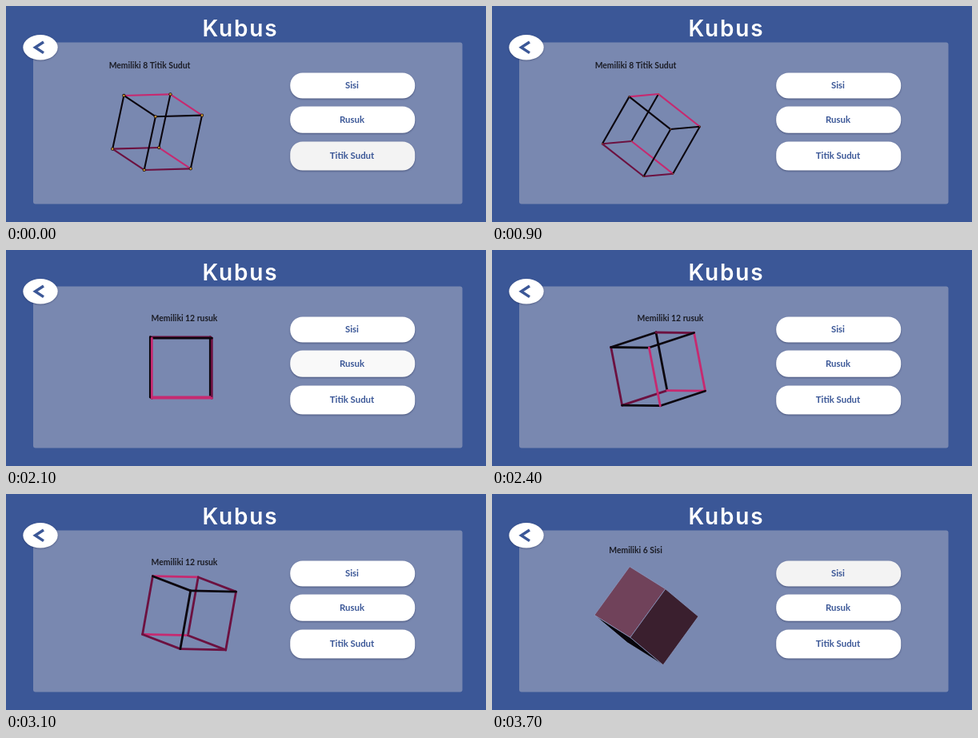
An HTML page with a canvas for the animation above (3.8 s loop, 600 by 270 pixels).

```html
<!DOCTYPE html>
<html lang="id">
<head>
<meta charset="utf-8">
<title>Kubus</title>
<style>
html, body { margin: 0; width: 100%; height: 100%; overflow: hidden; background: #3b5797; }
canvas { display: block; }
</style>
</head>
<body>
<canvas id="stage" width="600" height="270"></canvas>
<script>
const ctx = document.getElementById('stage').getContext('2d');
const LOOP = 3800, STEP = 100;
const BLUE = '#3b5797';
const INK = { k: '#0c060e', m: '#6c1140', p: '#c62a70' };

const clamp = x => Math.min(1, Math.max(0, x));
const progress = (t, from, to) => clamp((t - from) / (to - from));
const easeOut = f => Math.sin(f * Math.PI / 2);
const turn = (x, y, degrees) => {
  const r = degrees * Math.PI / 180;
  return [x * Math.cos(r) - y * Math.sin(r), x * Math.sin(r) + y * Math.cos(r)];
};

// Each cube stands on a fixed pivot: `lift` is the height of its centre above it, in cube sizes.
const cornerCube = { size: 71.7, x: 182, y: 191, lift: 0.5, line: 2.1 };
const edgeCube = { size: 75, x: 218.8, y: 207, lift: 0.8, line: 2.8 };
const solidCube = { size: 75, x: 171, y: 182.5, lift: 0.5 };

// Corner index bits: 1 = width, 2 = depth, 4 = height.
function corners({ size, x, y, lift }, { yaw, tilt, roll }) {
  return Array.from({ length: 8 }, (_, n) => {
    const [px, depth] = turn((n & 1) - 0.5, (n >> 1 & 1) - 0.5, -yaw);
    const [pz, py] = turn(depth, (n >> 2) - 0.5 - lift, tilt);
    const [sx, sy] = turn(px, py + 2 * Math.sin(tilt * Math.PI / 180) * pz * 0, roll);
    return [x + size * sx, y + size * sy, pz];
  });
}

// Corner pairs that differ in one bit: width edges, then depth, then height.
const EDGES = [1, 2, 4].flatMap(bit =>
  [...Array(8).keys()].filter(n => !(n & bit)).map(n => [n, n | bit]));

function drawWire(cube, points, colours) {
  const depth = ([a, b]) => points[a][2] + points[b][2];
  ctx.lineWidth = cube.line;
  ctx.lineCap = 'round';
  EDGES.map((edge, i) => ({ edge, colour: INK[colours[i]] }))
    .sort((p, q) => depth(p.edge) - depth(q.edge))
    .forEach(({ edge: [a, b], colour }) => {
      ctx.strokeStyle = colour;
      ctx.beginPath();
      ctx.moveTo(points[a][0], points[a][1]);
      ctx.lineTo(points[b][0], points[b][1]);
      ctx.stroke();
    });
}

function dot([x, y], r, colour) {
  ctx.fillStyle = colour;
  ctx.beginPath();
  ctx.arc(x, y, r, 0, 7);
  ctx.fill();
}

function drawCornerCube(t) {
  const f = progress(t, 300, 1400);
  const points = corners(cornerCube, {
    yaw: 38 + 36 * easeOut(f),
    tilt: 18 + 9 * f ** 4,
    roll: 12 + 39 * f ** 1.3
  });
  drawWire(cornerCube, points, f < 0.75 ? 'pkmmkpmpkkkk' : 'mpkkkpmpkkmk');
  const resting = t < 400;
  for (const p of points) {
    if (resting) dot(p, 2.1, '#1a1010');
    dot(p, resting ? 1.3 : 0.8, resting ? '#c9932f' : '#a0603f');
  }
}

function drawEdgeCube(t) {
  const f = easeOut(progress(t, 2100, 2500));
  const swing = -Math.cos(Math.PI * (Math.min(t, 3200) - 2450) / 800);
  const points = corners(edgeCube, { yaw: 1.5 + 40 * f, tilt: 1 + 9 * f, roll: 12 * swing * f });
  const colours = f === 0 ? 'mkppkmkpkkpm' : swing < 0 ? 'kkmkkmkpmkpp' : 'pkpmkmmmmmkm';
  drawWire(edgeCube, points, colours);
}

function face(colour, points) {
  ctx.beginPath();
  points.forEach(([x, y]) => ctx.lineTo(x, y));
  ctx.closePath();
  ctx.fillStyle = colour;
  ctx.fill();
  ctx.strokeStyle = '#8e9cc4';
  ctx.lineWidth = 0.7;
  ctx.lineJoin = 'round';
  ctx.stroke();
}

function drawSolidCube() {
  const p = corners(solidCube, { yaw: 44.5, tilt: -4, roll: 36 });
  face('#08060c', [p[4], p[6], p[7], p[5]]);
  face('#70425a', [p[0], p[2], p[6], p[4]]);
  face('#3a1f2e', [p[2], p[3], p[7], p[6]]);
}

function text(str, x, y, font, colour) {
  ctx.font = font;
  ctx.fillStyle = colour;
  ctx.fillText(str, x, y);
}

const caption = (str, x, y) => text(str, x, y, '700 10.4px Lato, sans-serif', '#1b1c25');

function shadow(blur, offset, colour) {
  ctx.shadowBlur = blur;
  ctx.shadowOffsetY = offset;
  ctx.shadowColor = colour;
}

function box(x, y, w, h, r, colour) {
  ctx.fillStyle = colour;
  ctx.beginPath();
  ctx.roundRect(x, y, w, h, r);
  ctx.fill();
}

// Darkens on press, stays slightly grey while selected, turns white once released.
function shade(t, press, release) {
  const since = t - press;
  if (since < 0) return 255;
  const dip = 43 * Math.sin(Math.PI * clamp((since + 100) / 400));
  return 243 - dip + 12 * progress(t, release - 100, release + 100);
}

function button(label, y, h, level) {
  shadow(2, 1, 'rgba(40,50,90,.6)');
  box(355.2, y, 156, h, 15.5, `rgb(${level},${level},${level})`);
  shadow(0, 0, 'transparent');
  text(label, 432.5, y + h / 2 + 3.9, '700 11.4px Lato, sans-serif', BLUE);
}

function drawBackground() {
  ctx.fillStyle = BLUE;
  ctx.fillRect(0, 0, 600, 270);
  box(34, 45.5, 536.5, 202, 3, '#7988b0');
  ctx.textAlign = 'center';
  ctx.letterSpacing = '1.8px';
  text('Kubus', 293, 38, '600 28px Inter, sans-serif', '#fff');
  ctx.letterSpacing = '0px';

  ctx.fillStyle = '#fff';
  shadow(2, 0.7, 'rgba(25,35,75,.5)');
  ctx.beginPath();
  ctx.ellipse(43, 51.8, 21.7, 15.7, 0, 0, 7);
  ctx.fill();
  shadow(0, 0, 'transparent');
  ctx.strokeStyle = BLUE;
  ctx.lineWidth = 3.4;
  ctx.lineCap = 'butt';
  ctx.lineJoin = 'miter';
  ctx.beginPath();
  ctx.moveTo(47, 45);
  ctx.lineTo(36.5, 51.8);
  ctx.lineTo(47, 58.6);
  ctx.stroke();
}

function draw(now) {
  const t = Math.floor(now % LOOP / STEP) * STEP;
  drawBackground();
  button('Sisi', 83.5, 32, shade(t, 3400, LOOP + STEP));
  button('Rusuk', 125.5, 33.2, shade(t, 1400, 2100));
  button('Titik Sudut', 169.5, 36, shade(t, -400, 400));

  if (t < 1500) {
    caption('Memiliki 8 Titik Sudut', 179.5, 78);
    drawCornerCube(t);
  } else if (t >= 1600 && t < 3500) {
    caption('Memiliki 12 rusuk', 223, 89);
    drawEdgeCube(t);
  } else if (t >= 3600) {
    caption('Memiliki 6 Sisi', 179.5, 73.5);
    drawSolidCube();
  }
}

const start = performance.now();
function tick() {
  draw(performance.now() - start);
  requestAnimationFrame(tick);
}
tick();
</script>
</body>
</html>
```
